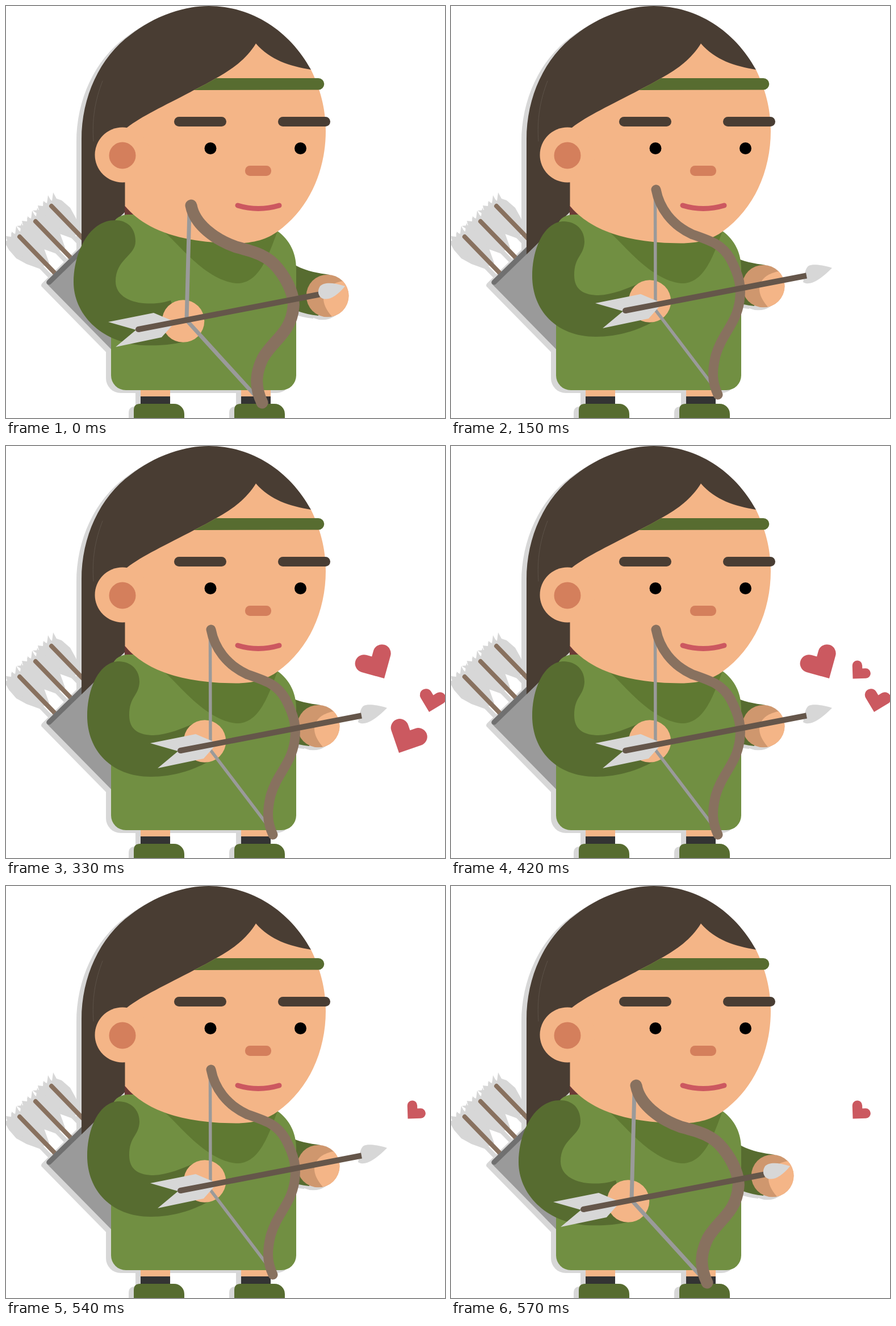
Recreate the animation shown at these times as an HTML page. Size 773 by 725 pixels, loop 0.6 s.

```html
<!DOCTYPE html>
<html lang="en">
<head>
<meta charset="utf-8">
<title>Archer</title>
<style>
  html, body { margin: 0; width: 100%; height: 100%; overflow: hidden; background: #fff; }
  svg { display: block; width: 100%; height: 100%; }
  .shadowed { filter: drop-shadow(-8.5px 5px 0 #d7d7d7); }
  .skin { fill: #f4b587; }
  .blush { fill: #d47f5c; }
  .hair { fill: #493d33; }
  .moss { fill: #576c30; }
  .pale { fill: #d7d7d7; }
  .heart { fill: #cb5960; }
  .line { fill: none; stroke-linecap: round; }
  .wood { stroke: #88715f; }
  .string { stroke: #9a9a9a; stroke-linecap: butt; }
</style>
</head>
<body>
<svg viewBox="0 0 773 725">
  <defs>
    <g id="spareArrow">
      <path class="pale" d="M3 -24 9 -13 18 -10 33 3 43 21 52 46 46 52 21 43 3 33 -10 18 -15 9 -24 3 -13 2 -15 -6 -6 -5 -5 -14 1 -9Z"/>
      <path class="line wood" stroke-width="8" d="M0 0 64 66"/>
    </g>
    <g id="leg">
      <path class="skin" d="M237 670h52v20h-52z"/>
      <path fill="#333" d="M237 687h52v16h-52z"/>
      <path class="moss" d="M225 730V711q0 -11 11 -11H296a18 18 0 0 1 18 18V730z"/>
    </g>
    <g id="shaft">
      <path class="pale" d="M180 556 260 540 298 556 274 583 193 600 229 570Z"/>
      <path d="M233 569 552 507.5" stroke="#65564a" stroke-width="10"/>
      <circle cx="233" cy="569" r="5" fill="#65564a"/>
    </g>
    <path id="heart" class="heart" d="M0 0V-23a8.7 8.7 0 0 1 17.4 0v5.6h5.6a8.7 8.7 0 0 1 0 17.4Z"/>
  </defs>

  <g class="shadowed">
    <use href="#spareArrow" x="80" y="352"/>
    <use href="#spareArrow" x="52" y="379"/>
    <use href="#spareArrow" x="24" y="406"/>
    <path fill="#9a9a9a" d="M73 483 150 407 270 520 190 609 73 490Q69 487 73 483Z"/>
    <path class="line" stroke="#707070" stroke-width="9" d="M76 486 146 418"/>
    <path class="hair" d="M133 437V235C133 160 165 90 220 50C238 36 263 21 290 12C312 4 335 0 357 0C433 0 500 44 537 112L210 362Z"/>
    <path fill="#6b3a35" d="M209 350 230 369H209Z"/>
    <use href="#leg"/>
    <use href="#leg" x="177"/>
    <g id="farArm">
      <path class="moss" d="M490 447 511 457C530 467 550 470 570 473L550 545Q530 543 511 536L490 532Z"/>
      <circle cx="566" cy="510" r="37.3" fill="#cf976e"/>
      <path class="skin" d="M593 484C560 490 546 515 574 546.5A37.3 37.3 0 0 0 593 484Z"/>
    </g>
    <path fill="#718f42" d="M185 650V392Q190 368 215 367H440L478 396C500 412 511 435 511 462V650a26 26 0 0 1-26 26H211a26 26 0 0 1-26-26Z"/>
    <path fill="#5f7932" d="M280 399C302 416 350 482 405 488C445 490 462 440 478 396Z"/>
    <path class="skin" d="M537 112C500 106 465 95 440 66C423 94 397 112 370 127C358 134 345 141 333 147C280 175 240 193 213 214L209.500 217V352C240 388 296 417 405 417.500C437 417.500 460 410 478 397C538 354 563 284 563 220C563 180 553 145 537 112Z"/>
    <path class="moss" d="M331 148Q351 138 370 127H550a10.300 10.300 0 0 1 0 20.600Z"/>
    <circle class="skin" cx="205" cy="262" r="48.500"/>
  </g>

  <path class="line" stroke="#62584e" stroke-width=".8" d="M154 238C151 200 157 165 170 132"/>
  <circle class="blush" cx="205" cy="263" r="23.500"/>
  <rect class="hair" x="296" y="195" width="92" height="17" rx="8.500"/>
  <rect class="hair" x="479" y="195" width="92" height="17" rx="8.500"/>
  <circle cx="360" cy="250.500" r="10.500"/>
  <circle cx="518.500" cy="250.500" r="10.500"/>
  <rect class="blush" x="421" y="281" width="46" height="18" rx="8.500"/>
  <path class="line" stroke="#cc5860" stroke-width="9" d="M408 351Q444 362 481 351"/>

  <g id="drawn">
    <path class="moss" d="M192 377C215 377 228 392 228 414C228 440 193 445 193 485C193 510 220 523 250 523.500C270 524 280 521 290 518L315 591C285 597 265 598 240 597C165 592 119 540 119 486C119 436 145 377 192 377Z"/>
    <circle class="skin" cx="312" cy="554.500" r="37.300"/>
    <path class="line string" stroke-width="7" d="M323 360 318 553 441 688"/>
    <path class="line wood" stroke-width="21" d="M326 351C332 385 370 412 405 424C440 433 462 440 479 462C500 488 508 515 506 530C502 575 470 588 452 620C440 645 437 668 451 698"/>
    <use href="#shaft"/>
    <path class="pale" d="M597 493C575 486 560 486 553 493C547 502 550 512 558 515C570 518 583 510 597 493Z"/>
  </g>

  <g id="released">
    <path class="moss" d="M199 379C222 380 235 395 235 415C234 440 217 440 217 474C217 500 235 509 260 509C285 508 310 497 330 489L355 556C330 570 295 582 255 582C185 582 143 535 143 475C143 425 165 379 199 379Z"/>
    <circle class="skin" cx="350" cy="519.500" r="37.300"/>
    <path class="line string" stroke-width="5.500" d="M359.500 330 360 535 468 677"/>
    <path class="line wood" stroke-width="17" d="M361 323C367 355 388 385 425 402C460 414 478 420 492 445C508 475 512 495 508 520C502 560 478 575 466 615C459 645 460 662 470 684"/>
    <path class="pale" d="M671 461C655 456 638 453 630 457C624 461 623 470 620 486C630 492 645 487 671 461Z"/>
    <use href="#shaft" x="74" y="-33"/>
  </g>

  <use id="heartLeft" href="#heart" transform="translate(666 409) rotate(-74.5) scale(1.8)"/>
  <use id="heartLow" href="#heart" transform="translate(692 540) rotate(-19) scale(1.8)"/>
  <use id="heartRight" href="#heart" transform="translate(745 468) rotate(-31) scale(1.24)"/>
  <use id="heartSmall" href="#heart" transform="translate(707.500 409.500) rotate(-2)"/>
</svg>
<script>
  const LOOP = 600;
  const RELEASE = 150, REDRAW = 570;
  const HEART_LIFE = 210;
  const heartStarts = { heartLow: 210, heartLeft: 300, heartRight: 330, heartSmall: 420 };

  const el = id => document.getElementById(id);
  const show = (id, on) => el(id).setAttribute('visibility', on ? 'visible' : 'hidden');

  function render() {
    const t = performance.now() % LOOP;
    const released = t >= RELEASE && t < REDRAW;
    show('drawn', !released);
    show('released', released);
    el('farArm').setAttribute('transform', released ? 'translate(-16 -17)' : '');
    for (const [id, start] of Object.entries(heartStarts)) {
      show(id, t >= start && t < start + HEART_LIFE);
    }
    requestAnimationFrame(render);
  }
  render();
</script>
</body>
</html>
```
